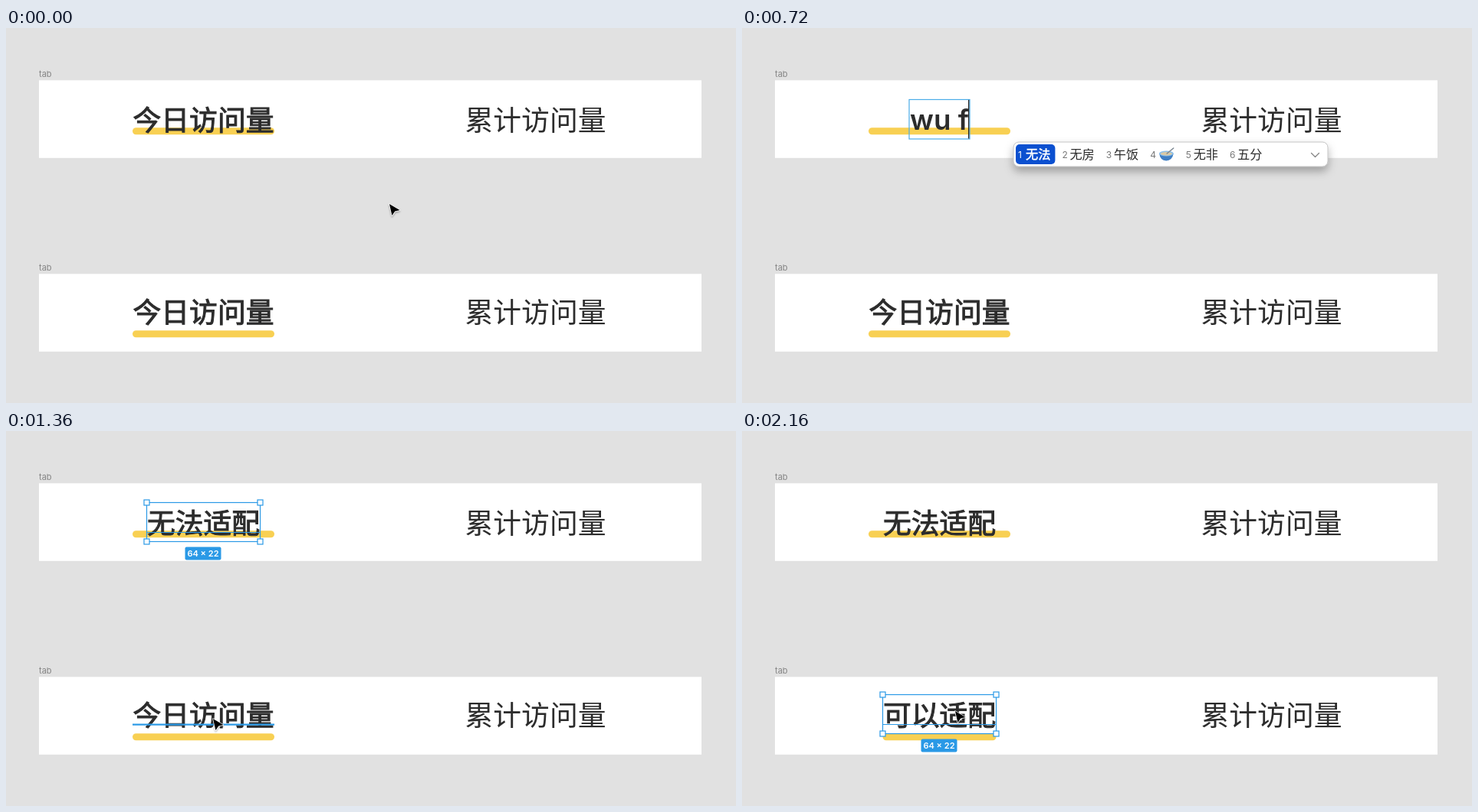
Write an HTML page that moves like this. It is 952 by 490 pixels and loops after 2.48 s.

```html
<!DOCTYPE html>
<html lang="zh">
<head>
<meta charset="utf-8">
<style>
  html, body { margin: 0; width: 100%; height: 100%; overflow: hidden; background: #e1e1e1; }
  svg { display: block; width: 952px; height: 490px; }
  text { font-family: "Noto Sans CJK SC", "Noto Sans SC", "Noto Sans CJK", sans-serif; white-space: pre; }
  .label { font: 11px Inter, sans-serif; fill: #858585; }
  .title { font-size: 36.8px; fill: #2c2c2c; }
  .strong { stroke: #2c2c2c; stroke-width: 1; }
  .latin { font-family: Inter, sans-serif; font-weight: 600; }
  .size { font: 600 11px Inter, sans-serif; fill: #fff; }
  .num { font: 12px Inter, sans-serif; fill: #777; }
  .word { font-size: 16.2px; fill: #2b2b2b; }
  .picked { fill: #fff; }
  .word.picked { stroke: #fff; stroke-width: .5; }
</style>
</head>
<body>
<svg viewBox="0 0 952 490" xmlns="http://www.w3.org/2000/svg">
  <defs>
    <filter id="soft" x="-10%" y="-60%" width="120%" height="260%">
      <feDropShadow dx="0" dy="6" stdDeviation="6" flood-color="#000" flood-opacity=".3"/>
    </filter>
    <filter id="drop" x="-60%" y="-60%" width="220%" height="220%">
      <feDropShadow dx="0" dy="1.5" stdDeviation="1" flood-color="#000" flood-opacity=".35"/>
    </filter>
  </defs>
  <g id="scene"></g>
</svg>
<script>
const LOOP = 2480, STEP = 80, LAST = 2160;
const CENTER = 257.5, EM = 37, ROW_GAP = 251;
const BLUE = '#2a99e6', YELLOW = '#f8d053';
const scene = document.getElementById('scene');

// Each entry: start time, text, box width, mode
const upper = [
  [0, '今日访问量', 5 * EM, 'idle'],
  [560, '今日访问量', 5 * EM, 'marked'],
  [640, 'w', 34, 'edit'],
  [720, 'wu f', 79, 'edit'],
  [800, 'wu fa s', 131, 'edit'],
  [880, 'wu fa shi', 164, 'edit'],
  [960, 'wu fa shi pei', 229, 'edit'],
  [1040, '无法适配', 4 * EM, 'edit'],
  [1120, '无法适配', 4 * EM, 'selected'],
  [1440, '无法适配', 4 * EM, 'idle']
];
const lower = [
  [0, '今日访问量', 5 * EM, 'idle'],
  [1520, '今日访问量', 5 * EM, 'marked'],
  [1600, 'k', 25, 'edit'],
  [1680, 'ke y', 77, 'edit'],
  [1760, 'ke yi sh', 140, 'edit'],
  [1840, 'ke yi shi p', 184, 'edit'],
  [1920, '可以适配', 4 * EM, 'edit'],
  [2000, '可以适配', 4 * EM, 'selected']
];

// Each entry: start time, left edge, candidate words
const popups = [
  [0, 0, ''],
  [640, 354, '我 为 无 问 我们 五'],
  [720, 354, '无法 无房 午饭 🥣 无非 五分'],
  [800, 354, '无法是 无法上 无法 无'],
  [880, 354, '无法是 无法使 无法 无 五'],
  [960, 354, '无法适配 无法适配宽度 无法 无 五'],
  [1040, 0, ''],
  [1600, 315, '看 可 开 快 可以 卡'],
  [1680, 315, '可以 可用 科研 课业'],
  [1760, 315, '可以是 可以使 可以试 可以'],
  [1840, 315, '可以适配 可以是 可以使 可以试'],
  [1920, 0, '']
];

// Pointer travels: start, end, from, to
const travels = [
  [0, 400, [500, 230], [263, 117]],
  [400, 560, [263, 117], [263, 117]],
  [1200, 1360, [160, 262], [270, 376]],
  [1360, 1520, [270, 376], [270, 376]],
  [2080, 2160, [272, 372], [278, 366]],
  [2160, LOOP, [278, 366], [278, 366]]
];

const at = (list, t) => list.filter(entry => entry[0] <= t).pop();
const rect = (x, y, w, h, extra) =>
  `<rect x="${x}" y="${y}" width="${w}" height="${h}" ${extra}/>`;
const text = (x, y, cls, str, extra = '') =>
  `<text x="${x}" y="${y}" class="${cls}" ${extra}>${str}</text>`;
const middle = 'text-anchor="middle"';

function pointerAt(t) {
  const travel = travels.find(([start, end]) => t >= start && t < end);
  if (!travel) return null;
  const [start, end, from, to] = travel;
  const u = (t - start) / (end - start);
  const eased = u * u * (3 - 2 * u);
  return from.map((v, i) => v + (to[i] - v) * eased);
}

function frame(dy) {
  return text(43, 64 + dy, 'label', 'tab') +
    rect(43, 68.3 + dy, 864, 101.5, 'fill="#fff"') +
    text(690.5, 134 + dy, 'title', '累计访问量', middle);
}

function selection(x, w, dy) {
  const y = 93.5 + dy, h = 51;
  const handles = [[x, y], [x + w, y], [x, y + h], [x + w, y + h]]
    .map(([cx, cy]) => rect(cx - 3.5, cy - 3.5, 7, 7, `fill="#fff" stroke="${BLUE}" stroke-width="1.2"`));
  return rect(x, y, w, h, `fill="none" stroke="${BLUE}" stroke-width="1.2"`) +
    rect(x, 132 + dy, w, 1, `fill="${BLUE}"`) + handles.join('') +
    rect(CENTER - 24, 151.5 + dy, 47, 17, `rx="2" fill="${BLUE}"`) +
    text(CENTER - .5, 164 + dy, 'size', '64 × 22', middle);
}

function tab([, str, w, mode], dy, barY, barWidth, pointer) {
  const x = CENTER - w / 2;
  const kind = /[a-z]/.test(str) ? 'latin' : 'strong';
  const hovered = pointer && pointer[0] > x && pointer[0] < x + w &&
    pointer[1] > 93 + dy && pointer[1] < 145 + dy;
  let out = rect(CENTER - barWidth / 2, barY, barWidth, 9, `rx="4.5" fill="${YELLOW}"`);
  if (mode === 'marked') out += rect(x, 94 + dy, w, 50, `fill="${BLUE}" opacity=".3"`);
  out += text(CENTER, (kind === 'latin' ? 133.3 : 134) + dy, 'title ' + kind, str, middle);
  if (mode === 'selected') out += selection(x, w, dy);
  if (mode === 'edit' || mode === 'marked')
    out += rect(x, 93.5 + dy, w, 51.5, 'fill="none" stroke="#4bace8" stroke-width="1.2"');
  if (mode === 'edit') out += rect(x + w - 2, 94 + dy, 1.3, 50.5, 'fill="#222"');
  if (mode === 'idle' && hovered) out += rect(x, 131.5 + dy, w, 2.2, `fill="${BLUE}"`);
  return out;
}

function bowl(x) {
  return `<g transform="translate(${x} 155)">
    <path d="M1 9Q2 18 10 18.5Q18 18 19.5 9Z" fill="#3f7fc4"/>
    <ellipse cx="10.2" cy="9" rx="9.4" ry="3.4" fill="#8cc0ea"/>
    <ellipse cx="10.2" cy="9.3" rx="7.6" ry="2.2" fill="#d9c9a5"/>
    <path d="M11 9L19.5 2" stroke="#7d8993" stroke-width="1.6" stroke-linecap="round"/></g>`;
}

function popup([, left, words]) {
  if (!words) return '';
  let out = rect(left, 149, 410, 32, 'rx="7" fill="#fff" stroke="#b5b5b5" stroke-width=".8" filter="url(#soft)"');
  let x = left + 6;
  words.split(' ').forEach((word, i) => {
    const isBowl = word === '🥣';
    const w = isBowl ? 21.5 : word.length * 16.2;
    const picked = i ? '' : ' picked';
    if (!i) out += rect(left + 3, 152, w + 19, 26, 'rx="5" fill="#0b50d0"');
    out += text(x, 170, 'num' + picked, i + 1);
    out += isBowl ? bowl(x + 11) : text(x + 10, 170.6, 'word' + picked, word);
    x += w + 25;
  });
  return out + `<path d="M${left + 388.5} 163.5l5 5l5-5" fill="none" stroke="#858585" stroke-width="1.3" stroke-linecap="round" stroke-linejoin="round"/>`;
}

function arrow([x, y]) {
  return `<path transform="translate(${x} ${y})" d="M0 0L13.5 8L7.2 9.6L3.4 15Z" fill="#000"
    stroke="#fff" stroke-width="1.4" stroke-linejoin="round" paint-order="stroke" filter="url(#drop)"/>`;
}

function draw(t) {
  const pointer = pointerAt(t), low = at(lower, t);
  scene.innerHTML = frame(0) + frame(253 - 0) .replace('y="387"', `y="${134 + ROW_GAP}"`) +
    tab(at(upper, t), 0, 130.3, 5 * EM, pointer) +
    tab(low, ROW_GAP, 395.2, low[2], pointer) +
    popup(at(popups, t)) + (pointer ? arrow(pointer) : '');
}

const begin = performance.now();
let shown = -1;
function tick() {
  const elapsed = (performance.now() - begin) % LOOP;
  const t = Math.min(Math.floor(elapsed / STEP) * STEP, LAST);
  if (t !== shown) draw(shown = t);
  requestAnimationFrame(tick);
}
tick();
</script>
</body>
</html>
```
